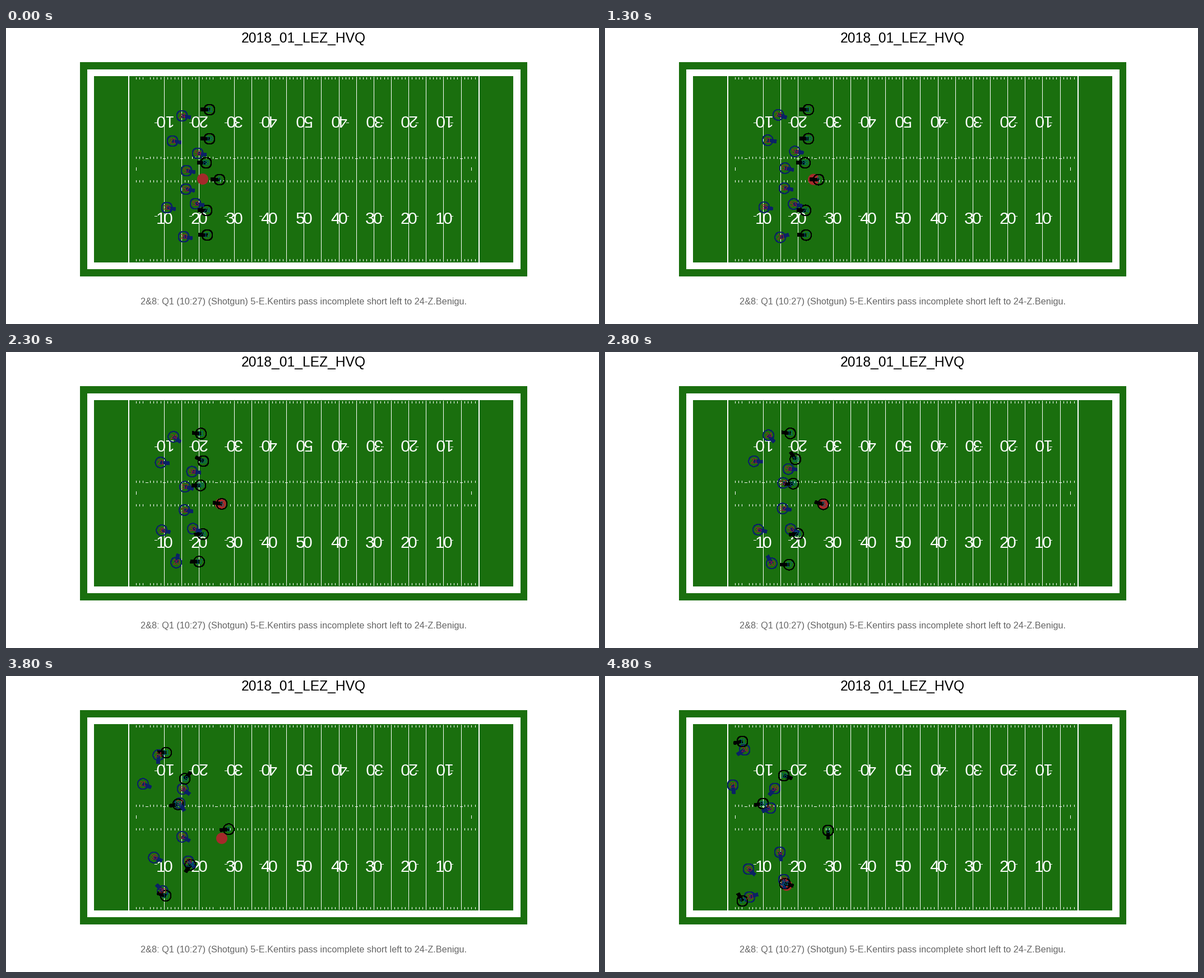
A matplotlib script that plays this animation: 1058 px wide and 529 px high, repeating every 4.9 s.

```python
import numpy as np
import matplotlib.pyplot as plt
from matplotlib.animation import FuncAnimation
from matplotlib.patches import Circle, Rectangle

W, H, DPI = 1058, 529, 100
FRAMES, STEP = 49, 100
PX = 72 / DPI                      # points per pixel
GREEN, NAVY, RED = "#1a6f0e", "#0b2265", "#a71930"
TEAL, BROWN = "#006778", "#a52a2a"
MIDFIELD, YARD = 531.67, 6.233

# Moments of the play, in frames
SNAP, SET, BREAK, THROW, END = 8, 12, 34, 36, 48

plt.rcParams["font.family"] = "Liberation Sans"
fig = plt.figure(figsize=(W / DPI, H / DPI), dpi=DPI, facecolor="white")
ax = fig.add_axes([0, 0, 1, 1])
ax.set_xlim(0, W)
ax.set_ylim(H, 0)
ax.axis("off")


def label(x, y, text, size, color, **kw):
    kw = {"ha": "center", "va": "baseline", **kw}
    return ax.text(x, y, text, size=size * PX, color=color, **kw)


def box(x0, y0, x1, y1, color="white"):
    ax.add_patch(Rectangle((x0, y0), x1 - x0, y1 - y0, fc=color, lw=0,
                           antialiased=False, zorder=1))


def yard_x(yard):
    return MIDFIELD + YARD * (yard - 50)


def draw_number(yard):
    """The yard number below, and the same turned round above."""
    x = yard_x(yard)
    tens = str(min(yard, 100 - yard) // 10)
    for cx, base, side, turn in ((x, 350.5, 1, 0), (x - 1, 155.5, -1, 180)):
        for text, shift in ((tens, -6.7), ("0", 6.7)):
            label(cx + side * shift, base, text, 30, "white", rotation=turn,
                  rotation_mode="anchor", zorder=2)
    if yard != 50:
        left = int(x - 17 if yard < 50 else x + 13)
        for y in (336, 169):
            box(left, y, left + 5, y + 1)


def draw_field():
    box(132, 61, 930, 444, GREEN)
    box(145, 74, 918, 431)
    box(157, 86, 905, 419, GREEN)
    for x in (218, 843):
        box(x, 86, x + 2, 419)
    for yard in range(2, 100):
        x = int(yard_x(yard))
        if yard % 5:
            for y in (88, 230, 272, 413):
                box(x, y, x + 1, y + 4)
        else:
            if yard not in (5, 25):
                box(x, 87, x + 1, 418)
            box(x - 2, 233, x + 3, 234)
    for x in (232, 830):
        box(x, 249, x + 1, 255)
    for yard in range(10, 100, 10):
        draw_number(yard)


class Player:
    """Ring, jersey number and a bar that shows where the player faces.

    Each one speeds up from the start to the break of the route, then
    runs on evenly to the end. Poses are (x, y, facing in degrees).
    """

    def __init__(self, number, start, turn, end):
        self.start = np.array((*start, self.stance), float)
        self.turn, self.end = np.array(turn, float), np.array(end, float)
        self.ring = ax.add_patch(Circle((0, 0), 9.5, fill=False, lw=PX,
                                        ec=self.main, zorder=4,
                                        antialiased=False))
        self.bar, = ax.plot([], [], color=self.main, lw=5.5 * PX, zorder=5,
                            solid_capstyle="butt", antialiased=False)
        self.text = label(0, 0, number, 12, self.accent, zorder=6)

    def pose(self, t):
        if t < BREAK:
            s = max(0, (t - self.go) / (BREAK - self.go)) ** 2
            return self.start + s * (self.turn - self.start)
        s = (t - BREAK) / (END - BREAK)
        return self.turn + s * (self.end - self.turn)

    def move(self, t):
        x, y, face = self.pose(t)
        a = np.radians(face)
        self.ring.center = x, y
        self.bar.set_data([x, x + 15.5 * np.cos(a)], [y, y + 15.5 * np.sin(a)])
        self.text.set_position((x, y + 4))


class Offence(Player):
    main, accent, stance, go = "black", TEAL, 182, SET


class Defence(Player):
    main, accent, stance, go = NAVY, RED, 10, 0


draw_field()
label(531, 26, "2018_01_LEZ_HVQ", 24.6, "black")
label(531, 494, "2&8: Q1 (10:27) (Shotgun) 5-E.Kentirs pass incomplete short "
      "left to 24-Z.Benigu.", 16.3, "#666666")

passer = Offence("5", (381, 271), (397, 273, 207), (398, 276, 90))
players = [
    Defence("24", (314, 157), (281, 145, 68), (249, 132, 147)),
    Defence("21", (297, 202), (251, 192, 0), (228, 195, 83)),
    Defence("59", (342, 224), (320, 202, 0), (303, 201, 130)),
    Defence("57", (322, 255), (316, 224, 20), (295, 236, 157)),
    Defence("52", (321, 288), (315, 276, 8), (312, 315, 82)),
    Defence("53", (338, 314), (328, 318, 28), (319, 364, 85)),
    Defence("35", (287, 321), (267, 316, 14), (256, 345, 42)),
    Defence("20", (317, 373), (288, 380, -180), (258, 395, -18)),
    Offence("11", (363, 146), (302, 145, 191), (245, 117, 169)),
    Offence("18", (363, 198), (319, 186, 285), (319, 178, 379)),
    Offence("88", (357, 241), (317, 230, 170), (282, 228, 170)),
    Offence("24", (358, 326), (332, 324, 167), (321, 371, 15)),
    Offence("17", (359, 370), (301, 389, 180), (245, 402, 240)),
    passer,
]
ball = ax.add_patch(Circle((0, 0), 10, fc=BROWN, lw=0, zorder=3))
SPOT, CATCH = np.array((351, 270)), np.array((324, 374))


def ball_at(t):
    """Snapped to the passer, carried, then thrown in a straight line."""
    if t <= THROW:
        s = np.clip((t - SNAP) / 20, 0, 1) ** 0.25
        return SPOT + s * (passer.pose(t)[:2] - SPOT)
    hand = passer.pose(THROW)[:2]
    return hand + (t - THROW) / (END - THROW) * (CATCH - hand)


def update(frame):
    for p in players:
        p.move(frame)
    ball.center = ball_at(frame)
    return []


anim = FuncAnimation(fig, update, frames=FRAMES, interval=STEP, repeat=True,
                     repeat_delay=0, init_func=lambda: update(0))
plt.show()
```
